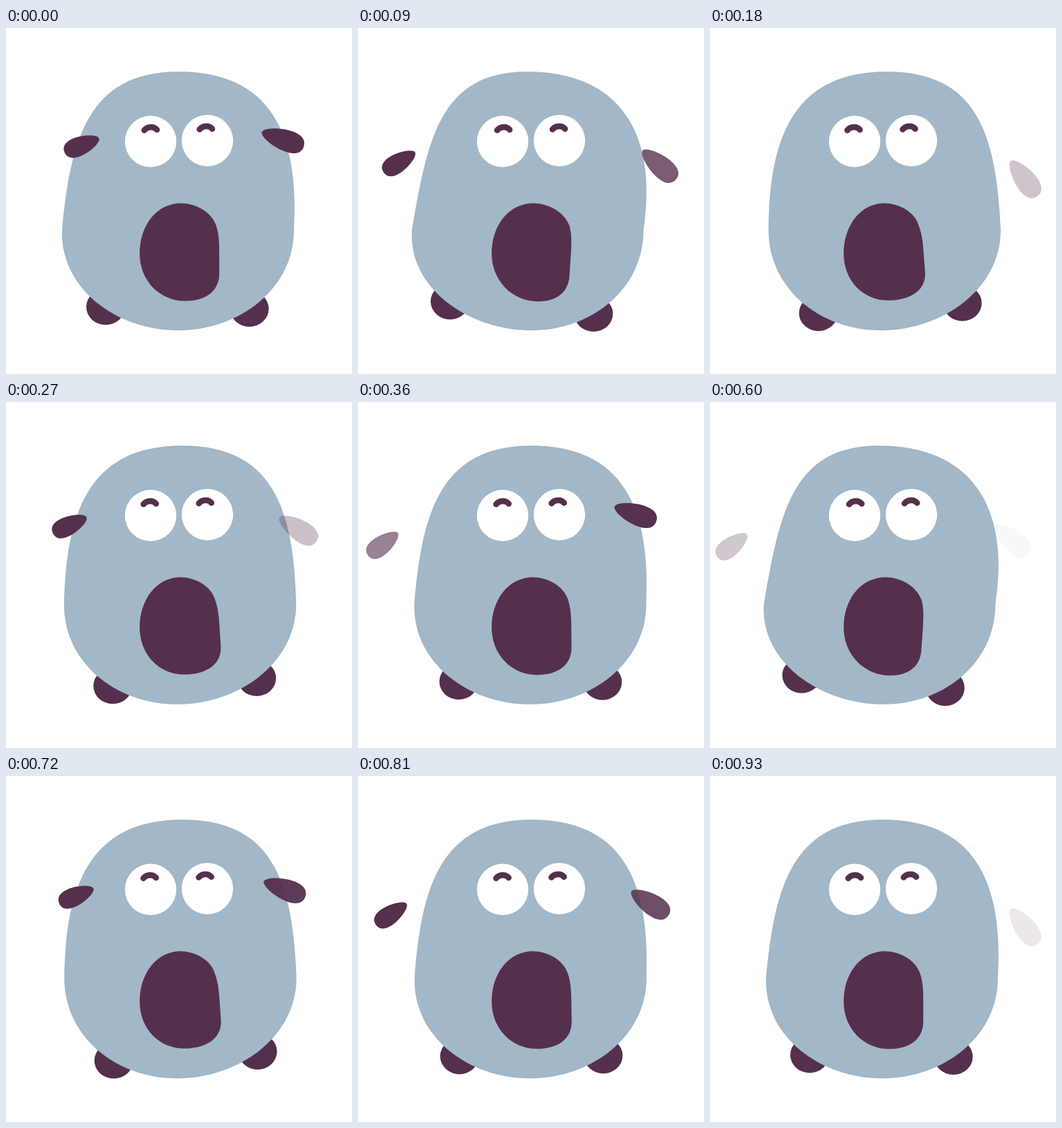
These frames come from a looping animation (500 by 500 pixels, 0.96 s). An HTML page:

```html
<!DOCTYPE html>
<html lang="en">
<head>
<meta charset="utf-8">
<title>Screaming blob</title>
<style>
  html, body { margin: 0; width: 100%; height: 100%; overflow: hidden; background: #fff; }
  svg { display: block; width: 100vw; height: 100vh; }
  .dark { fill: #55304c; }
  .lid { fill: none; stroke: #55304c; stroke-width: 8.5; stroke-linecap: round; }
</style>
</head>
<body>
<svg viewBox="0 0 500 500">
  <ellipse id="footL" class="dark" rx="28" ry="26"/>
  <ellipse id="footR" class="dark" rx="28" ry="26"/>
  <path id="body" fill="#a2b7c7"/>
  <circle cx="209" cy="164" r="37.2" fill="#fff"/>
  <circle cx="291" cy="162.7" r="37.2" fill="#fff"/>
  <g id="lids" class="lid">
    <path d="M199.8 147.8C204 142 214 141.5 218 147"/>
    <path d="M279.8 146.6C284 140.8 294 140.3 298 145.8"/>
  </g>
  <path id="mouth" class="dark"/>
  <path id="armL" class="dark"/>
  <path id="armR" class="dark"/>
</svg>
<script>
const LOOP = 960, STEP = 30;
const $ = id => document.getElementById(id);
const ramp = (x, a, b) => Math.min(1, Math.max(0, (x - a) / (b - a)));
const ease = (x, a, b) => (1 - Math.cos(Math.PI * ramp(x, a, b))) / 2;

// All phases below are counted in steps.
// The body dips left, whips right and drifts back to rest.
const sway = p => 1.15 * (2 * ease(p, 4, 6.4) - ease(p, .95, 4) - ease(p, 6.4, 13.5));

const arms = [
  { // flies out, fades, starts again
    el: $('armL'), period: 7.8, flip: -1, a: 27, b: 13.3,
    from: [109.5, 169.5, 22], to: [30, 208.5, 38],
    move: p => ramp(p, 0, 4.5) ** 1.15,
    fade: p => 1 - ramp(p, 3.96, 4.56)
  },
  { // flies out, fades, comes back into view
    el: $('armR'), period: 12.4, flip: 1, a: 32, b: 15,
    from: [400, 161, 19], to: [454, 217.5, 53],
    move: p => ease(p, 0, 5) * (1 - ramp(p, 6.2, 12.4)) ** 1.5,
    fade: p => (1 - ramp(p, 0, 6.22)) ** .38 + ease(p, 7, 12.4)
  }
];

const leaf = (a, b) =>
  `M${-a} 0C${-a} ${-.75 * b} ${a} ${-1.9 * b} ${a} 0` +
  `C${a} ${1.9 * b} ${-a} ${.75 * b} ${-a} 0Z`;

arms.forEach(arm => arm.el.setAttribute('d', leaf(arm.a, arm.b)));

function place(el, x, y) {
  el.setAttribute('cx', x);
  el.setAttribute('cy', y);
}

function bodyPath(s) {
  const left = 81 + 3.5 * s, right = 416 + 4 * s, top = 249 + 6 * s;
  return `M${left} 292C${93 - 8 * s} 165 117 63 ${top} 63` +
    `C${380 + 4 * s} 63 ${425 - 11 * s} 150 ${right} 293` +
    `C${right} 375 ${339 - s} 437 ${249 - 2 * s} 437` +
    `C${158 - s} 437 ${left - 3 + 3 * s} 375 ${left} 292Z`;
}

function mouthPath(s) {
  const low = 394.5 - .8 * s;
  return `M193.2 326C193.2 285 218 253.3 ${253 - s} 253.3` +
    `C${275 - s} 253.3 ${297.5 - s} 267 ${303.5 - 2 * s} 285` +
    `C${308 - 1.5 * s} 298 ${308.2 - .3 * s} 312 ${308.2 + .5 * s} 325` +
    `L${308.2 + 2.8 * s} 355C${308 + 3 * s} 383 ${285 - s} ${low} ${259 - 1.5 * s} ${low}` +
    `C${222 - s} ${low} 193.2 365 193.2 326Z`;
}

function draw(ms) {
  const n = Math.floor((ms % LOOP) / STEP);
  const s = sway(n % 15.5);

  place($('footL'), 144 + 12.7 * s, 403 + 9 * s);
  place($('footR'), 351.7 + 13 * s, 405.7 - 8.2 * s);
  $('body').setAttribute('d', bodyPath(s));
  $('mouth').setAttribute('d', mouthPath(s));
  $('lids').setAttribute('transform', `translate(${-1.4 * s} 0)`);

  for (const { el, period, flip, from, to, move, fade } of arms) {
    const p = n % period, k = move(p);
    const [x, y, turn] = from.map((v, i) => v + (to[i] - v) * k);
    el.setAttribute('transform', `translate(${x} ${y}) scale(${flip} 1) rotate(${turn})`);
    el.setAttribute('opacity', fade(p));
  }
}

const start = performance.now();
function tick() {
  draw(performance.now() - start);
  requestAnimationFrame(tick);
}
tick();
</script>
</body>
</html>
```
